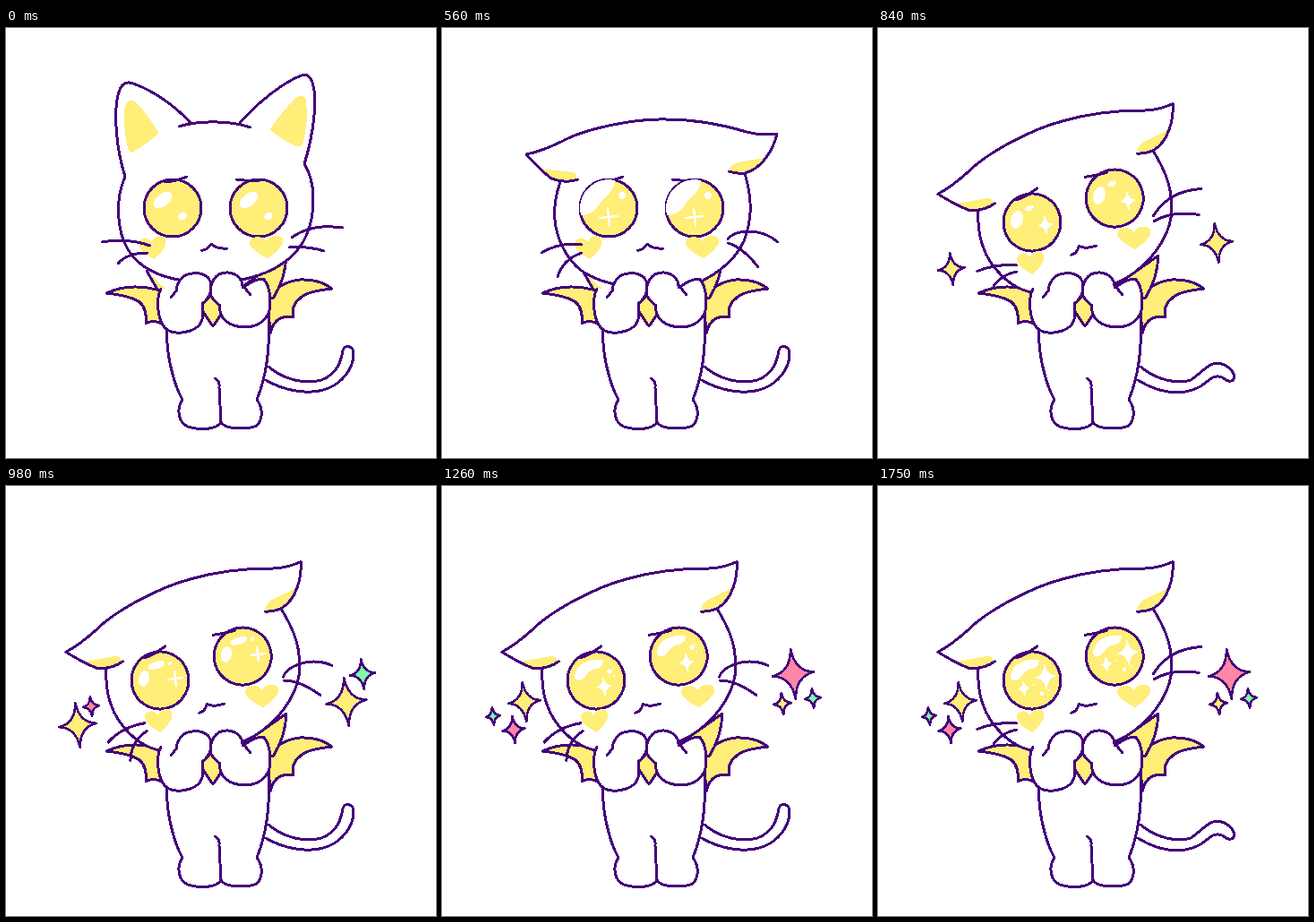
Animation of 480x480 px, one loop 1820 ms. Source, as an HTML page:

```html
<!DOCTYPE html>
<html lang="en">
<head>
<meta charset="utf-8">
<title>Hopeful winged cat</title>
<style>
  html, body { margin: 0; width: 100%; height: 100%; overflow: hidden; background: #fff; }
  svg { display: block; width: 100vw; height: 100vh; }
</style>
</head>
<body>
<svg id="stage" viewBox="0 0 480 480" stroke-linecap="round" stroke-linejoin="round" shape-rendering="crispEdges"></svg>
<script>
const INK = '#43007a', YELLOW = '#ffee78', PINK = '#ff86a6', GREEN = '#7dfba6', WHITE = '#fff';
const LOOP = 1820, LINE = 3;

const shape = (d, fill = 'none', stroke = INK, width = LINE) =>
  `<path d="${d}" fill="${fill}" stroke="${stroke}" stroke-width="${width}"/>`;
const flat = (d, fill) => shape(d, fill, 'none');
const group = (transform, content) => `<g transform="${transform}">${content}</g>`;

// Shiny marks inside an eye, relative to its centre
const oval = (x, y, rx, ry = rx, turn = 0) =>
  `<ellipse rx="${rx}" ry="${ry}" fill="${WHITE}" transform="translate(${x} ${y}) rotate(${turn})"/>`;
const plus = (x, y, r) => shape(`M${x - r} ${y + 1}L${x + r} ${y - 1}M${x - 1} ${y - r}L${x + 1} ${y + r}`, 'none', WHITE, 2.4);

// Four-pointed star with inward curving sides
const starPath = r => {
  const w = r * .83, a = r * .09, b = r * .1;
  return `M0 ${-r}Q${a} ${-b} ${w} 0Q${a} ${b} 0 ${r}Q${-a} ${b} ${-w} 0Q${-a} ${-b} 0 ${-r}Z`;
};
const star = (x, y, r, fill, stroke, width) =>
  group(`translate(${x} ${y}) rotate(-6)`, shape(starPath(r), fill, stroke, width));
const sparkle = (x, y, r, color) => star(x, y, r, color, INK, 2.6);
const glint = (x, y, r) => star(x, y, r, WHITE, WHITE, 1.5);

const heart = (place, scale, turn) => group(`translate(${place}) rotate(${turn}) scale(${scale} 1)`,
  flat('M0 13C-6 9-17 0-15-7C-13-13-4-14 0-6C4-14 13-13 15-7C17 0 6 9 0 13Z', YELLOW));

const tails = {
  up: 'M293 378C310 393 335 398 352 393C370 386 374 372 376 360C378 353 388 354 388 364C388 380 375 396 360 402C335 412 305 402 290 393',
  down: 'M293 378C310 393 335 398 349 393C358 388 366 376 377 374C388 374 397 382 398 390C396 396 390 395 386 391C378 386 372 390 367 395C350 410 320 412 290 393'
};

const whiskers = {
  high: 'M107 239Q135 234 161 243M125 263Q135 251 158 251M319 234Q340 218 376 223M316 245Q336 243 355 249',
  low: 'M111 251Q130 239 156 242M129 278Q135 258 156 251M319 236Q325 227 345 227Q362 228 375 239M319 240Q336 245 353 267',
  raised: 'M112 236Q134 234 156 242M125 257Q138 247 154 249M318 232Q342 210 378 218M317 238Q340 232 367 245'
};

const wings =
  shape('M112 296Q140 283 175 294L180 333Q165 324 156 330Q158 313 148 305Q135 298 112 296Z', YELLOW) +
  shape('M364 291Q350 280 328 281Q308 283 292 300L295 341Q300 319 321 323Q318 309 328 302Q335 294 364 291Z', YELLOW);

const collar = shape('M157 271L169 292L190 302', YELLOW) + shape('M262 290L313 254Q312 280 298 302Z', YELLOW);

const body =
  shape('M180 336C178 360 186 395 197 415C190 425 192 440 203 445C215 449 235 449 240 440C245 449 270 448 280 444C287 436 287 424 280 415C290 390 295 360 293 325', WHITE) +
  shape('M240 440L238 402Q239 394 233 391');

const paws =
  shape('M229 298L216 311L231 333L246 311Z', YELLOW) +
  shape('M173 291C166 305 170 330 180 337C190 343 210 340 217 330C222 322 220 313 219 308C229 300 232 288 226 279C218 271 200 272 194 282C190 288 190 290 191 292', WHITE) +
  shape('M191 292L184 301') +
  shape('M287 280C291 283 295 292 295 305C296 322 285 333 268 334C250 334 237 325 239 310C236 307 231 304 229 299C226 285 234 272 248 273C258 274 264 281 264 288', WHITE) +
  shape('M264 287L273 298M264 290Q278 280 287 280');

const uprightHead =
  flat('M133 166C122 190 123 225 136 247C150 270 180 284 228 284C285 284 322 262 335 232C347 205 345 170 333 152L273 111Q230 100 193 110Z', WHITE) +
  shape('M333 152C345 170 347 205 335 232C322 262 285 284 228 284C180 284 150 270 136 247C123 225 122 190 133 166') +
  shape('M133 166C123 135 120 95 125 75C128 62 134 59 142 62C165 70 190 88 206 106', WHITE) +
  shape('M261 106C280 84 310 60 330 53C338 50 342 57 344 70C347 95 340 130 333 152', WHITE) +
  shape('M193 110C215 103 250 103 273 111') +
  flat('M132 90Q135 79 143 81Q160 98 170 117Q168 122 141 139Q136 138 135 130Q131 110 132 90Z', YELLOW) +
  flat('M295 113Q310 90 325 77Q333 73 335 81Q338 105 331 130Q328 134 322 131Q300 120 295 113Z', YELLOW);

const flatTop = 'M94 141Q110 138 133 127C160 112 215 101 250 102C290 102 320 110 340 116C355 120 365 119 374 118C370 135 358 157 338 162Q328 163 320 160';
const flatJaw = 'M132 172C122 200 124 225 136 247C147 268 161 276 178 282C215 294 250 295 270 290C302 281 327 260 337 238C347 212 346 190 338 162';
const flatHead =
  flat(`${flatJaw}L320 160L152 169Z`, WHITE) +
  flat(`${flatTop}L152 169Q138 174 122 168Q108 157 94 141Z`, WHITE) +
  flat('M108 157L146 161Q152 163 150 169Q130 175 108 157Z', YELLOW) +
  flat('M361 145Q345 147 330 150Q320 154 321 160Q345 164 361 145Z', YELLOW) +
  shape(flatTop) + shape('M94 141Q108 157 122 168Q138 174 152 169') + shape(flatJaw);

const eye = x => `<circle cx="${x}" cy="201" r="32" fill="${YELLOW}" stroke="${INK}" stroke-width="${LINE}"/>`;
const face = eye(186) + eye(282) +
  shape('M177 172Q190 171 202 166M257 169Q270 171 282 171M218 248Q224 249 229 241Q235 247 247 246');

const upright = { turn: '', eyes: ['186 201', '282 201'], hearts: ['164 245', '291 244'] };
const tilted = {
  turn: 'translate(172 217) rotate(-16.3) translate(-186 -201)',
  eyes: ['172 217', '264 190'], hearts: ['171 262', '286 234']
};

const blobs = (size, spread) => oval(-11, -9 - spread, 12 * size, 7 * size, -38) + oval(11 + spread / 2, 9, 5 + spread * 1.5, 4 + spread, -42);
const halfShine = flat('M-31 8C-15 8-12-4-5-11C3-18 6-22 7-31A32 32 0 0 0-31 8Z', WHITE);
const arc = flat('M-24-3C-24-14-14-25 8-23C8-16 4-13-4-12C-11-9-12-1-18 0Q-23 1-24-3Z', WHITE);
const sideShine = oval(-17, -3, 7, 10, 15);

const lateSparkles = sparkle(57, 257, 10, GREEN) + sparkle(80, 272, 15, PINK) + sparkle(92, 241, 22, YELLOW) +
  sparkle(392, 210, 28, PINK) + sparkle(380, 243, 12, YELLOW) + sparkle(414, 237, 11, GREEN);
const wideSparkles = sparkle(50, 262, 20, PINK) + sparkle(82, 268, 12, GREEN) + sparkle(86, 239, 14, YELLOW) +
  sparkle(385, 238, 20, YELLOW) + sparkle(413, 213, 20, PINK) + sparkle(391, 198, 10, GREEN);

const poses = [
  { at: 0, whisker: 'high', shine: blobs(1, 0) },
  { at: 140, whisker: 'low', shine: blobs(1.2, 2) },
  { at: 280, whisker: 'high', shine: blobs(1.5, 4) },
  { at: 420, whisker: 'low', shine: blobs(1.6, 5) },
  { at: 560, whisker: 'low', head: flatHead, shine: halfShine + oval(15, -14, 4) + plus(0, 10, 10) },
  { at: 700, whisker: 'low', head: flatHead, layout: tilted, shine: sideShine + oval(0, -15, 2) + glint(12, 7, 10),
    sparkles: sparkle(86, 270, 14, PINK) + sparkle(375, 239, 19, YELLOW) },
  { at: 840, whisker: 'raised', head: flatHead, layout: tilted, tail: 'down',
    shine: sideShine + oval(-3, -16, 5, 3, -20) + glint(15, 3, 9),
    sparkles: sparkle(82, 269, 18, YELLOW) + sparkle(378, 240, 22, YELLOW) },
  { at: 980, whisker: 'low', head: flatHead, layout: tilted,
    shine: oval(-18, -2, 6, 9, 10) + oval(-4, -17, 10, 4, -18) + oval(11, -19, 2) + plus(17, -2, 8),
    sparkles: sparkle(80, 267, 25, YELLOW) + sparkle(95, 246, 11, PINK) + sparkle(380, 241, 27, YELLOW) + sparkle(398, 210, 17, GREEN) },
  { at: 1120, whisker: 'raised', head: flatHead, layout: tilted, tail: 'down',
    shine: arc + glint(14, 3, 9) + oval(12, -14, 2.5), sparkles: wideSparkles },
  { at: 1260, whisker: 'low', head: flatHead, layout: tilted,
    shine: arc + glint(9, 7, 9) + oval(15, -10, 2.8) + oval(20, -5, 1.5) + oval(19, -13, 1.5), sparkles: lateSparkles },
  { at: 1400, whisker: 'raised', head: flatHead, layout: tilted, tail: 'down',
    shine: arc + glint(12, 2, 9) + oval(-7, 8, 2.5) + oval(16, -13, 2), sparkles: wideSparkles },
  { at: 1750, whisker: 'raised', head: flatHead, layout: tilted, tail: 'down',
    shine: arc + glint(15, -4, 13) + glint(-9, 9, 7) + oval(11, 15, 2.2) + oval(2, 5, 1.5) + oval(19, 11, 1.5), sparkles: lateSparkles }
];

function draw({ whisker, shine, head = uprightHead, layout = upright, tail = 'up', sparkles = '' }) {
  const { turn, eyes, hearts } = layout;
  return shape(tails[tail], WHITE) + wings + collar + body +
    group(turn, head + face) +
    heart(hearts[0], 1, -8) + heart(hearts[1], 1.22, -4) +
    group(turn, shape(whiskers[whisker])) +
    eyes.map(centre => group(`translate(${centre})`, shine)).join('') +
    paws + sparkles;
}

const stage = document.getElementById('stage');
let shown;
function tick() {
  const time = performance.now() % LOOP;
  const pose = poses.findLast(p => p.at <= time);
  if (pose !== shown) stage.innerHTML = draw(shown = pose);
  requestAnimationFrame(tick);
}
tick();
</script>
</body>
</html>
```
